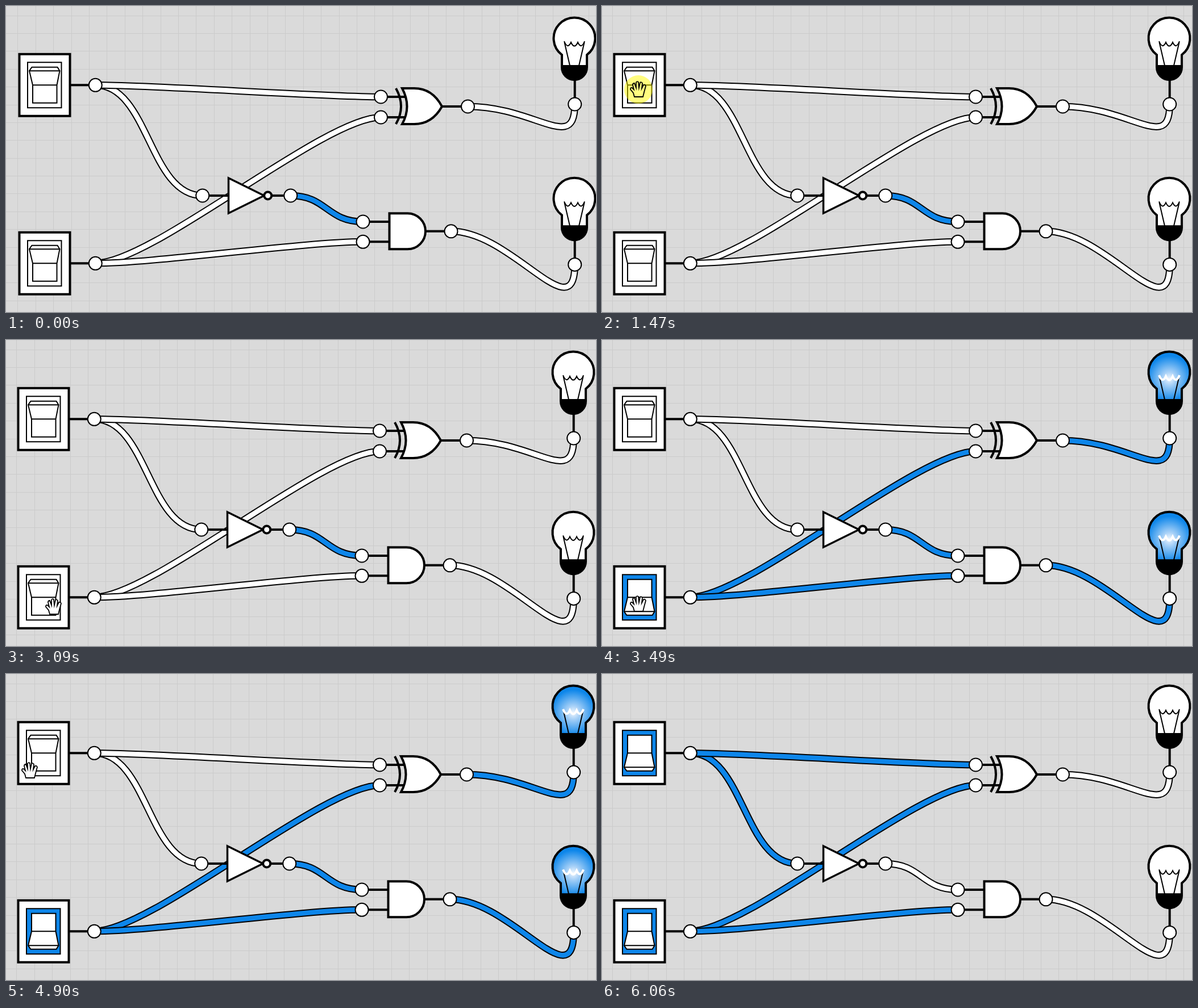
Animation of 1038x539 px, one loop 7390 ms. Source, as an HTML page with a canvas:

```html
<!DOCTYPE html>
<html lang="en">
<head>
<meta charset="utf-8">
<title>Logic circuit</title>
<style>
html, body { margin: 0; width: 100%; height: 100%; overflow: hidden; background: #dadada; }
canvas { display: block; width: 100vw; height: 100vh; }
</style>
</head>
<body>
<canvas id="stage" width="1038" height="539"></canvas>
<script>
const ctx = document.getElementById('stage').getContext('2d');
const LOOP = 7390, CELL = 31.4, BLUE = '#0d86ea';
const PAN_TIME = 1070, HAND_SHOW = 370, HAND_HIDE = 6060;

const within = (t, spans) => spans.some(([a, b]) => t >= a && t < b);
const switchA = [[1640, 2640], [5350, LOOP]];
const switchB = [[3490, 4190], [4500, LOOP]];
const presses = [[1000, 1140], [1470, 1640], [2560, 2640], [3320, 3490],
                 [4040, 4190], [4420, 4500], [5200, 5350]];

// Hand moves: start time, step duration, waypoints [step, x, y]
const moves = [
  [370, 78, [[0, 800, 485], [4, 390, 305], [6, 130, 180], [8, 32, 132]]],
  [1320, 75, [[0, 48, 141], [1, 64, 147]]],
  [2560, 75.7, [[0, 64, 147], [1, 64, 147], [2, 66, 165], [5, 88, 385], [7, 84, 470], [9, 64, 465]]],
  [4420, 80, [[0, 64, 465], [1, 64, 465], [2, 50, 430], [4, 27, 280], [6, 42, 170], [8, 72, 129]]],
  [5520, 77, [[0, 86, 140], [2, 250, 235], [6, 826, 528]]]
];

function handPosition(t) {
  const [start, step, points] = moves.filter(m => t >= m[0]).pop();
  const k = Math.floor((t - start) / step);
  const next = points.findIndex(p => p[0] >= k);
  if (next < 0) return points[points.length - 1].slice(1);
  if (next === 0) return points[0].slice(1);
  const [k0, x0, y0] = points[next - 1], [k1, x1, y1] = points[next];
  const f = (k - k0) / (k1 - k0);
  return [x0 + (x1 - x0) * f, y0 + (y1 - y0) * f];
}

function shape(d, fill, stroke, width) {
  const path = new Path2D(d);
  if (fill) { ctx.fillStyle = fill; ctx.fill(path); }
  if (stroke) { ctx.strokeStyle = stroke; ctx.lineWidth = width; ctx.stroke(path); }
}

function circle(x, y, r, fill, width) {
  ctx.beginPath();
  ctx.arc(x, y, r, 0, 7);
  ctx.fillStyle = fill;
  ctx.fill();
  if (width) { ctx.strokeStyle = '#000'; ctx.lineWidth = width; ctx.stroke(); }
}

const port = (x, y) => circle(x, y, 11.5, '#fff', 2);
const lead = (x, y, end) => shape(`M${x} ${y}H${end}`, null, '#000', 4);

function cable(d, on) {
  shape(d, null, '#000', 12.5);
  shape(d, null, on ? BLUE : '#fff', 8.5);
}

function wire(x0, y0, x1, y1, on) {
  const h = Math.min(100, (x1 - x0) / 2);
  cable(`M${x0} ${y0}C${x0 + h} ${y0} ${x1 - h} ${y1} ${x1} ${y1}`, on);
}

function at(x, y, draw) {
  ctx.save();
  ctx.translate(x, y);
  draw();
  ctx.restore();
}

function drawGrid() {
  ctx.fillStyle = '#dadada';
  ctx.fillRect(-4, 0, 1048, 539);
  ctx.fillStyle = '#cbcbcb';
  for (let x = 20.4 - CELL; x < 1042; x += CELL) ctx.fillRect(Math.round(x), 0, 1, 539);
  for (let y = 16.5; y < 539; y += CELL) ctx.fillRect(-4, Math.round(y), 1048, 1);
}

function drawSwitch(y, on) {
  lead(112, y, 147);
  at(68, y, () => {
    shape('M-44.5 -54.5h89v109h-89z', '#fff', '#000', 4);
    shape('M-30 -40h59.5v80h-59.5z', on ? BLUE : '#fff', '#000', 2);
    if (on) ctx.scale(1, -1);
    shape('M-22.5 -31.5h45l4 6.5l-5 25v31.5h-42.5v-31.5l-6 -25z', '#fff', '#000', 2);
    shape('M-27 -25h53.5M-21 0h42.5', null, '#000', 2);
  });
  port(157.3, y);
}

function drawBulb(y, on) {
  at(1000, y, () => {
    let glass = '#fff';
    if (on) {
      glass = ctx.createRadialGradient(0, 11, 0, 0, 11, 40);
      glass.addColorStop(0, '#f0f7fe');
      glass.addColorStop(0.3, '#a6d0f7');
      glass.addColorStop(1, BLUE);
    }
    shape('M0.7 70V108', null, '#000', 4);
    shape('M-22 49V29A36.5 36.5 0 1 1 22 29V49z', glass, '#000', 4);
    shape('M-24 47H24V51A24 24 0 0 1 -24 51z', '#000');
    shape('M-17.5 7L-8 48M17.5 7L8 48', null, '#000', 2);
    shape('M-18 5Q-12 20 -6 7Q0 20 6 7Q12 20 18 5', null, on ? '#fff' : '#000', on ? 4 : 2);
  });
  port(1000.7, y + 116);
}

function drawXor() {
  lead(670, 160, 704);
  lead(670, 196, 704);
  lead(767, 177, 802);
  shape('M686 145Q704 177 686 208', null, '#000', 4);
  shape('M697 145H718C742 145 757 158 767 177C757 195 742 208 718 208H697Q714 177 697 145z', '#fff', '#000', 4);
  port(659.5, 160);
  port(659.5, 196);
  port(812.5, 177);
}

function drawNot() {
  lead(356, 334, 392);
  lead(467, 334, 491);
  shape('M391.5 303V365L454 334z', '#fff', '#000', 3.5);
  circle(460.7, 334, 6.5, '#fff', 4);
  port(345.7, 334);
  port(500.7, 334);
}

function drawAnd() {
  lead(638, 380, 675);
  lead(638, 415.3, 675);
  lead(738, 396.8, 773);
  shape('M674.5 365.3H706.5A31.5 31.5 0 0 1 706.5 428.3H674.5z', '#fff', '#000', 4);
  port(628, 380);
  port(628, 415.3);
  port(783, 396.8);
}

const HAND = 'M-7 13L-9 6L-14 0Q-14 -4 -11 -3L-8 0L-10 -8Q-10 -11 -7 -11L-4 -3V-12Q-3 -15 0 -13' +
  'L1 -3L3 -12Q5 -14 7 -11L6 -2L9 -8Q12 -9 13 -6L10 5L8 13z';

function drawHand(t) {
  at(...handPosition(t), () => {
    shape(HAND, '#fff');
    if (within(t, presses)) circle(0, 0, 25, 'rgba(255,250,0,.5)');
    shape(HAND, null, '#000', 1.8);
  });
}

function drawCircuit(a, b) {
  const xor = a !== b, and = !a && b;
  wire(157.3, 139.3, 345.7, 334, a);
  wire(157.3, 139.3, 659.5, 160, a);
  wire(157.3, 453.3, 659.5, 196, b);
  wire(157.3, 453.3, 628, 415.3, b);
  wire(500.7, 334, 628, 380, !a);
  cable('M812.5 177C932 177 1000.7 260 1000.7 173', xor);
  cable('M783 396.8C890 396.8 1000.7 572 1000.7 455.3', and);
  drawSwitch(139.3, a);
  drawSwitch(453.3, b);
  drawXor();
  drawNot();
  drawAnd();
  drawBulb(57, xor);
  drawBulb(339.4, and);
}

function frame(now) {
  const t = now % LOOP;
  at(t < PAN_TIME ? 0 : -2, 0, () => {
    drawGrid();
    drawCircuit(within(t, switchA), within(t, switchB));
  });
  if (t >= HAND_SHOW && t < HAND_HIDE) drawHand(t);
  requestAnimationFrame(() => frame(performance.now()));
}
frame(performance.now());
</script>
</body>
</html>
```
